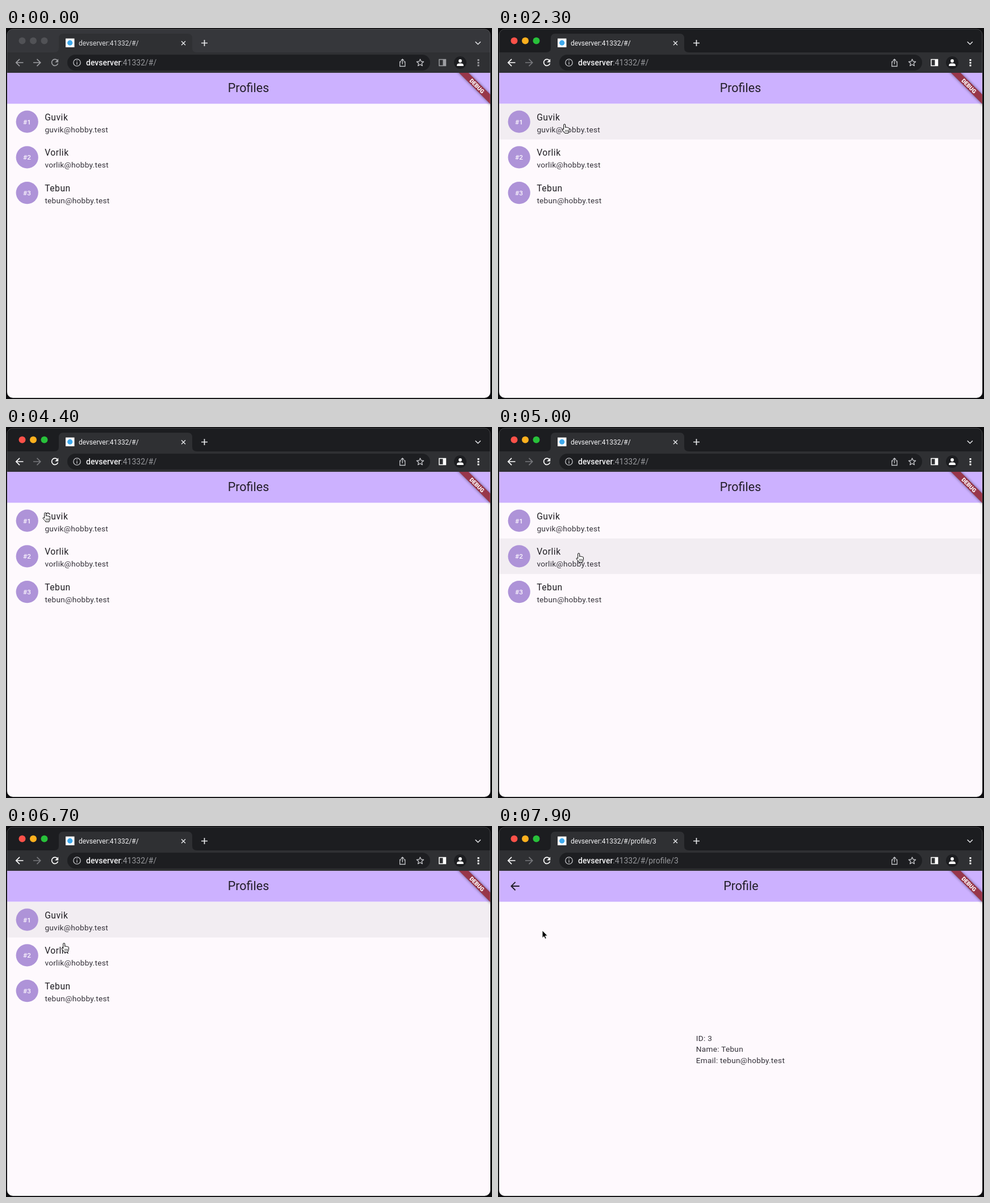
An HTML page that plays this animation: 856x654 px, repeating every 8 s.

```html
<!DOCTYPE html>
<html lang="en">
<head>
<meta charset="utf-8">
<title>Profiles</title>
<style>
html, body { margin: 0; width: 100%; height: 100%; overflow: hidden; background: #0d0d0f; }
svg { display: block; }
text { font-family: Roboto, sans-serif; white-space: pre; }
#stage { --strip: #36373b; --icon: #9c9da1; --dim: #9c9da1; --tab: #dcdde0; --red: #515256; --amber: #515256; --green: #515256; }
#stage.focus { --strip: #1c1d20; --icon: #fff; --dim: #77787c; --tab: #f4f4f6; --red: #fc5149; --amber: #fdb01e; --green: #28c13a; }
.line { fill: none; stroke: var(--c, var(--icon)); stroke-width: 1.7; }
.soft { --c: #c4c5c9; stroke-width: 1.3; }
.bright { --c: #e8e9ec; }
.title { font-size: 21.5px; fill: #231f29; text-anchor: middle; }
.name { font-size: 15.7px; letter-spacing: .49px; fill: #211f24; }
.body { font-size: 13.7px; letter-spacing: .245px; fill: #35323a; }
.num { font-size: 11.8px; font-weight: 500; fill: #fdf8ff; text-anchor: middle; }
</style>
</head>
<body>
<svg id="stage" width="856" height="654" viewBox="0 0 856 654">
  <defs>
    <clipPath id="win"><rect x="2" y="2" width="851" height="650" rx="10"/></clipPath>
    <clipPath id="view"><rect x="2" y="79" width="851" height="573"/></clipPath>
    <filter id="blur" x="-20%" y="-100%" width="140%" height="300%"><feGaussianBlur stdDeviation="2.6"/></filter>
  </defs>
  <g clip-path="url(#win)">
    <rect width="856" height="80" fill="var(--strip)"/>
    <path d="M85 43q8 0 8-8V18q0-8 8-8H320q8 0 8 8V35q0 8 8 8H853V79H2V43z" fill="#2f3033"/>

    <circle cx="28.5" cy="22.5" r="6" fill="var(--red)"/>
    <circle cx="48" cy="22.5" r="6" fill="var(--amber)"/>
    <circle cx="67.5" cy="22.5" r="6" fill="var(--green)"/>
    <rect x="105" y="18.5" width="15.5" height="15.5" fill="#fff"/>
    <circle cx="112.7" cy="26.2" r="4.6" fill="#3fa9ec"/>
    <text id="tab" x="128" y="30.6" font-size="12" fill="var(--tab)"></text>
    <path class="line bright" style="stroke-width:1.4" d="M309 23.2l7 7m0-7l-7 7"/>
    <path class="line bright" d="M344 26.5h11m-5.5-5.5v11"/>
    <path class="line bright" style="stroke-width:1.5" d="M826.7 24.2l4.6 4.6 4.6-4.6"/>

    <path class="line" d="M30.5 61H18m6-6.2L17.8 61l6.2 6.2"/>
    <path class="line" style="--c:var(--dim)" d="M48 61h12.5m-6-6.2L60.700 61l-6.2 6.2"/>
    <path class="line" d="M90.700 57.500a5.600 5.600 0 1 0 .8 5"/>
    <path d="M92.200 54.500v6h-6z" fill="var(--icon)"/>

    <rect x="108" y="47" width="639" height="28" rx="14" fill="#1d1e21"/>
    <circle class="line soft" cx="125" cy="61" r="6.2"/>
    <path class="line soft" d="M125 60v4.500m0-7.500v1.500"/>
    <text x="141" y="65.800" font-size="14" fill="#97989c"><tspan fill="#f1f1f3" font-weight="500">devserver</tspan><tspan id="path"></tspan></text>
    <path class="line soft" d="M696 59.500h-2.300v8h9.200v-8h-2.300M698.300 64v-8.800m-2.800 2.600l2.800-2.800 2.800 2.800"/>
    <path class="line soft" stroke-linejoin="round" d="M729.500 55l1.800 4 4.300.4-3.300 2.900 1 4.300-3.800-2.300-3.800 2.300 1-4.300-3.300-2.900 4.300-.4z"/>
    <rect class="line" x="763" y="55.500" width="11.500" height="11" style="stroke-width:1.500"/>
    <rect x="769.500" y="55" width="5" height="12" fill="var(--icon)"/>
    <circle cx="800" cy="61" r="11" fill="#1c1d20"/>
    <circle cx="800" cy="58" r="2.900" fill="#fff"/>
    <path d="M794.200 67v-1.500q0-3.300 5.800-3.300t5.800 3.300V67z" fill="#fff"/>
    <path d="M830.500 55h3v3h-3zm0 4.700h3v3h-3zm0 4.700h3v3h-3z" fill="var(--icon)"/>

    <g clip-path="url(#view)">
      <g id="list">
        <rect x="2" y="79" width="851" height="573" fill="#fef9fd"/>
        <rect x="2" y="79" width="851" height="54.500" fill="#ccb1ff"/>
        <text class="title" x="427" y="113">Profiles</text>
        <rect id="hover" x="2" width="851" height="62.700" fill="#f2edf2"/>
        <g id="rows"></g>
      </g>
      <g id="page">
        <rect x="2" y="79" width="851" height="573" fill="#fef9fd"/>
        <rect x="2" y="79" width="851" height="54.500" fill="#ccb1ff"/>
        <circle id="halo" cx="29.400" cy="106" r="19.600" fill="#1e1928" fill-opacity=".08"/>
        <path transform="translate(17.700 94.300) scale(.98)" fill="#231f29" d="M20 11H7.830l5.590-5.590L12 4l-8 8 8 8 1.410-1.410L7.830 13H20z"/>
        <text class="title" x="427.500" y="113">Profile</text>
        <g id="detail">
          <text class="body" x="348.400" y="378.500"></text>
          <text class="body" x="348.400" y="398.200"></text>
          <text class="body" x="348.400" y="417.900"></text>
        </g>
      </g>
      <g transform="translate(829.500 102.200) rotate(45)">
        <rect x="-60" y="-6" width="120" height="12" fill="#000" opacity=".5" filter="url(#blur)"/>
        <rect x="-60" y="-5.900" width="120" height="11.800" fill="#98364a"/>
        <text y="3.600" font-size="10" font-weight="900" fill="#fff" text-anchor="middle">DEBUG</text>
      </g>
    </g>
  </g>
  <rect x="2" y="2" width="851" height="650" rx="10" fill="none" stroke="#fff" stroke-opacity=".2"/>

  <g id="cursor">
    <path id="arrow" d="M0 0V13.500l3-2.800 2 4.500 2.300-1-2-4.400h4.100z" fill="#000" stroke="#fff" stroke-width="1"/>
    <g id="hand" transform="translate(-5.300 0)" stroke="#000" stroke-linejoin="round">
      <path fill="#fff" d="M4 10V2a1.500 1.500 0 0 1 3 0v4.500c.3-1.100 2.200-1 2.500.2.400-.8 2.100-.6 2.300.5.600-.6 2-.2 2 1v3c0 2-1.300 3-1.600 5.200H6c-.4-1.700-2.200-3-4.300-5.500C.6 9.400 2.400 8 4 10z"/>
      <path fill="none" stroke-width=".8" d="M7.200 10.500v3.500m2.200-3.500v3.500m2.200-3.500v3.500"/>
    </g>
  </g>
</svg>
<script>
const LOOP = 8000, STEP = 100, FOCUS = 1700, SLIDE = 450, WIDTH = 851;
const ROW_TOP = 133.8, ROW = 62.7;
const people = ['Guvik', 'Vorlik', 'Tebun'];
const email = name => name.toLowerCase() + '@hobby.test';

// opened at, closed at
const visits = [[2650, 3950], [5150, 5950], [7500, Infinity]];

// time, x, y of the pointer
const track = [
  [600, 225, 617], [1000, 150, 420], [1400, 104, 232], [1500, 117, 169],
  [3200, 117, 169], [3400, 50, 115], [3600, 27, 112], [4200, 27, 112],
  [4500, 90, 170], [4800, 142, 222], [5350, 142, 222], [5600, 60, 140],
  [5750, 27, 114], [6300, 27, 114], [6600, 84, 180], [6700, 102, 206],
  [7000, 100, 285], [7550, 100, 285], [7900, 78, 184], [8000, 60, 150]
];

const $ = id => document.getElementById(id);
const show = (el, on) => el.setAttribute('visibility', on ? 'inherit' : 'hidden');
const shift = (el, x, y = 0) => el.setAttribute('transform', `translate(${x} ${y})`);
const ease = x => 1 - (1 - Math.min(1, Math.max(0, x))) ** 3.5;

$('rows').innerHTML = people.map((name, i) => `
  <g transform="translate(0 ${i * ROW})">
    <circle cx="37.2" cy="165.200" r="19.600" fill="#ae93d8"/>
    <text class="num" x="37" y="169.600">#${i + 1}</text>
    <text class="name" x="68.200" y="162.500">${name}</text>
    <text class="body" x="68.400" y="183.700">${email(name)}</text>
  </g>`).join('');

function pointer(t) {
  const i = track.findIndex(k => k[0] > t);
  if (i < 1) return track[0].slice(1);
  const [t0, x0, y0] = track[i - 1], [t1, x1, y1] = track[i];
  const p = (t - t0) / (t1 - t0);
  return [x0 + (x1 - x0) * p, y0 + (y1 - y0) * p];
}

function rowAt(y) {
  const row = Math.floor((y - ROW_TOP) / ROW);
  return row >= 0 && row < people.length ? row : -1;
}

function draw(t) {
  const focused = t >= FOCUS;
  const id = visits.findLastIndex(v => t >= v[0]);
  const [opened, closed] = visits[id] || [0, 0];
  const open = id >= 0 && t < closed;
  const slide = id < 0 ? 0 : open ? ease((t - opened) / SLIDE) : 1 - ease((t - closed) / SLIDE);

  $('stage').classList.toggle('focus', focused);
  const path = ':41332/#/' + (open ? 'profile/' + (id + 1) : '');
  $('tab').textContent = 'devserver' + path;
  $('path').textContent = path;

  shift($('list'), -slide * WIDTH / 3);
  shift($('page'), (1 - slide) * WIDTH);
  show($('page'), slide > 0);
  if (id >= 0) {
    const name = people[id];
    [`ID: ${id + 1}`, `Name: ${name}`, `Email: ${email(name)}`]
      .forEach((line, i) => $('detail').children[i].textContent = line);
  }

  const [x, y] = pointer(t);
  const onList = focused && slide < .01;
  // the highlight trails the pointer by one step
  const row = onList ? rowAt(pointer(t - STEP)[1]) : -1;
  show($('hover'), row >= 0);
  $('hover').setAttribute('y', ROW_TOP + row * ROW);

  const onBack = open && slide > .97 && Math.hypot(x - 29.4, y - 106) < 20;
  show($('halo'), onBack);

  const hand = onBack || onList && rowAt(y) >= 0;
  show($('cursor'), t >= track[0][0]);
  show($('hand'), hand);
  show($('arrow'), !hand);
  shift($('cursor'), x, y);
}

let start;
function tick(now) {
  start ??= now;
  draw(Math.floor((now - start) % LOOP / STEP) * STEP);
  requestAnimationFrame(tick);
}
draw(0);
requestAnimationFrame(tick);
</script>
</body>
</html>
```
